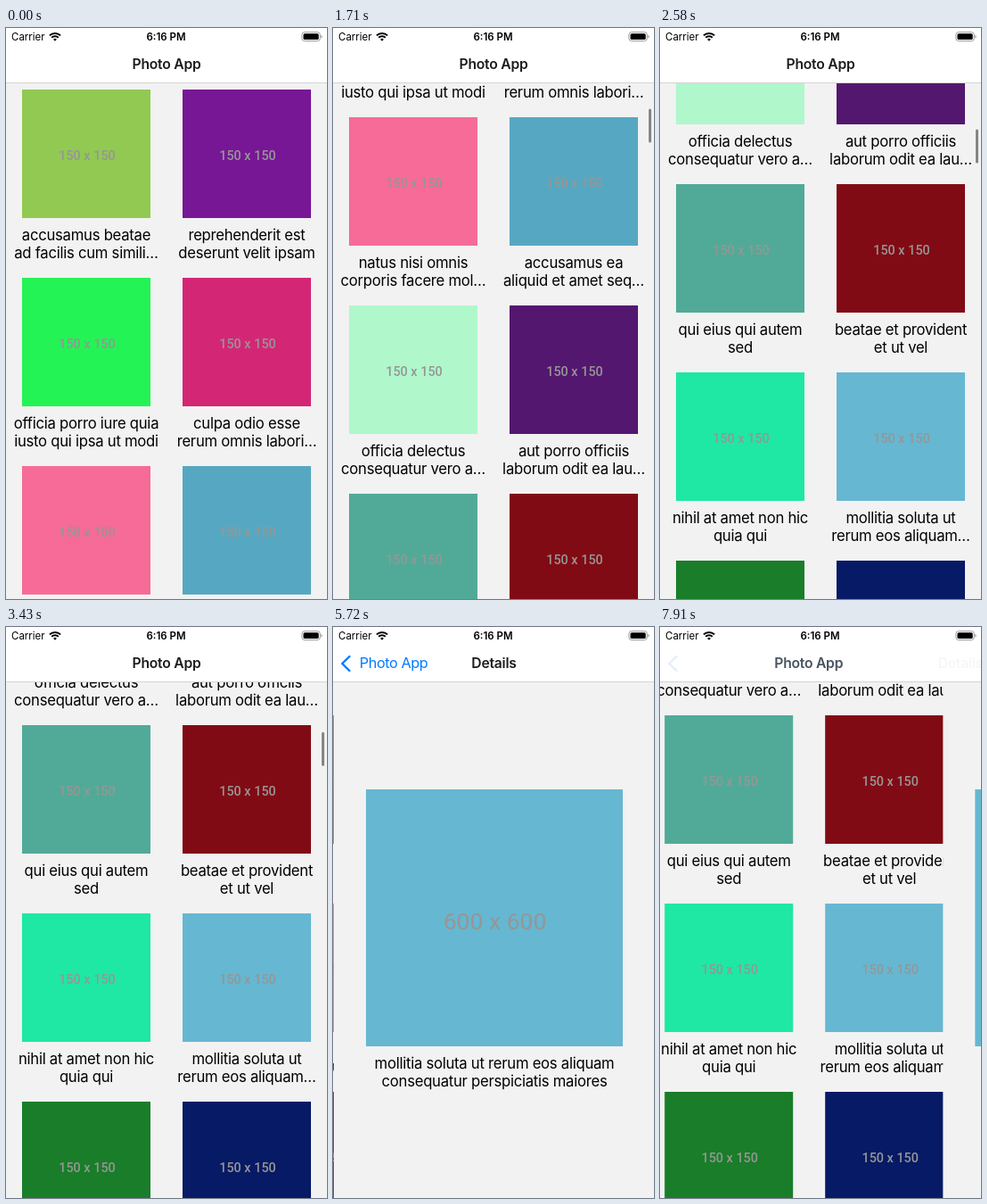
An HTML page that plays this animation: 360x640 px, repeating every 8 s.

```html
<!DOCTYPE html>
<html lang="en">
<head>
<meta charset="utf-8">
<title>Photo App</title>
<style>
  html, body { margin: 0; width: 100%; height: 100%; overflow: hidden; background: #fff; }
  svg { display: block; width: 360px; height: 640px; font-family: Inter, "Open Sans", sans-serif; }
  .label { font-size: 16.7px; letter-spacing: -.27px; text-anchor: middle; }
  .size { font-family: Roboto, Arial, sans-serif; font-size: 14.4px; font-weight: 500; fill: #969696; text-anchor: middle; }
  .big { font-size: 26.5px; font-weight: 400; }
  .title { font-size: 15.7px; font-weight: 600; letter-spacing: -.25px; fill: #1c1c1e; text-anchor: middle; }
  .back { font-size: 16.2px; letter-spacing: -.38px; fill: #007aff; }
  .status { font-size: 11.5px; }
</style>
</head>
<body>
<svg viewBox="0 0 360 640">
  <rect width="360" height="640" fill="#f2f2f2"/>
  <g id="home">
    <g id="list"></g>
    <rect id="bar" x="354" width="3" height="38" rx="1.5" fill="#858585"/>
  </g>
  <g id="detail">
    <rect width="360" height="640" fill="#f2f2f2"/>
    <rect x="36" y="182" width="288" height="288" fill="#66b7d2"/>
    <text class="size big" x="180.5" y="338.5">600 x 600</text>
    <text class="label" x="180" y="494.5">mollitia soluta ut rerum eos aliquam</text>
    <text class="label" x="180" y="515.2">consequatur perspiciatis maiores</text>
  </g>
  <rect width="360" height="61.5" fill="#fff"/>
  <rect y="61" width="360" height="1" fill="#d4d4d4"/>
  <text id="homeTitle" class="title" y="46">Photo App</text>
  <text id="detailTitle" class="title" y="46">Details</text>
  <g id="back">
    <path d="M18.5 33 L10.3 41 L18.5 49" fill="none" stroke="#007aff" stroke-width="2.4" stroke-linecap="round" stroke-linejoin="round"/>
    <text id="backLabel" class="back" y="46">Photo App</text>
  </g>
  <g class="status">
    <text x="6" y="14">Carrier</text>
    <text x="179.5" y="14" font-weight="600" text-anchor="middle">6:16 PM</text>
    <path d="M48.9 8.4a8.7 8.7 0 0 1 12.2 0M51.2 10.7a5.4 5.4 0 0 1 7.6 0" fill="none" stroke="#000" stroke-width="2"/>
    <path d="M53.1 12.7a2.7 2.7 0 0 1 3.8 0L55 14.8z"/>
    <rect x="331.9" y="4.7" width="20.4" height="9.8" rx="2.8" fill="none" stroke="#999" stroke-width="1"/>
    <rect x="333.5" y="6.2" width="17.2" height="6.8" rx="1.6"/>
    <path d="M353.4 8v3.4q1.3-.4 1.3-1.7t-1.3-1.7z" fill="#999"/>
  </g>
</svg>
<script>
const LOOP = 8000, ROW = 211, REST = 815, OMEGA = 0.015;
const PUSH = 5180, POP = 7665;

const photos = [
  ['#92c952', 'accusamus beatae', 'ad facilis cum simili…'],
  ['#771796', 'reprehenderit est', 'deserunt velit ipsam'],
  ['#24f355', 'officia porro iure quia', 'iusto qui ipsa ut modi'],
  ['#d32776', 'culpa odio esse', 'rerum omnis labori…'],
  ['#f66b97', 'natus nisi omnis', 'corporis facere mol…'],
  ['#56a8c2', 'accusamus ea', 'aliquid et amet seq…'],
  ['#b0f7cc', 'officia delectus', 'consequatur vero a…'],
  ['#54176f', 'aut porro officiis', 'laborum odit ea lau…'],
  ['#51aa97', 'qui eius qui autem', 'sed'],
  ['#810b14', 'beatae et provident', 'et ut vel'],
  ['#1ee8a4', 'nihil at amet non hic', 'quia qui'],
  ['#66b7d2', 'mollitia soluta ut', 'rerum eos aliquam…'],
  ['#197d29', '', ''],
  ['#061a65', '', '']
];

// The screen refreshes in coarse steps: [first, last, count]
const runs = [[1370, 2140, 8], [2250, 2980, 8], [3080, 3850, 8], [3960, 3960, 1],
              [4100, 4100, 1], [5190, 5720, 6], [7600, 7910, 4]];
// Distance left to scroll while the flick decays
const decay = [[1370, 790], [1700, 424], [2562.86, 77], [3410, 12], [4100, 1]];

const $ = id => document.getElementById(id);
const shift = (id, x, y = 0) => $(id).setAttribute('transform', `translate(${x} ${y})`);
const fade = (id, v) => $(id).setAttribute('opacity', v);

$('list').innerHTML = photos.map(([color, a, b], i) => {
  const x = i % 2 * 180, y = 69 + Math.floor(i / 2) * ROW;
  return `<g transform="translate(${x} ${y})">
    <rect x="18" width="144" height="144" fill="${color}"/>
    <text class="size" x="91" y="79">150 x 150</text>
    <text class="label" x="90" y="168.5">${a}</text>
    <text class="label" x="90" y="189.2">${b}</text></g>`;
}).join('');

function snap(t) {
  let at = 0;
  for (const [first, last, count] of runs) {
    if (t < first) break;
    const step = count > 1 ? (last - first) / (count - 1) : 1;
    at = first + step * Math.min(count - 1, Math.floor((t - first) / step + 1e-6));
  }
  return at;
}

function scrollAt(t) {
  if (t < decay[0][0]) return 0;
  for (let i = 1; i < decay.length; i++) {
    const [t0, a] = decay[i - 1], [t1, b] = decay[i];
    if (t <= t1) return Math.round(REST - a * Math.pow(b / a, (t - t0) / (t1 - t0)));
  }
  return REST - 1;
}

// Critically damped spring: share of the way left
function spring(ms) {
  const x = Math.max(0, ms) * OMEGA;
  return (1 + x) * Math.exp(-x);
}

function render(time) {
  const t = snap(time);
  const scroll = scrollAt(t);
  const p = t < POP ? 1 - spring(t - PUSH) : spring(t - POP);

  shift('list', 0, -scroll);
  shift('home', -108 * p);
  shift('detail', 360 * (1 - p));
  $('bar').setAttribute('y', 64.5 + scroll * 0.0664);
  fade('bar', t >= 1370 && t < 5190 ? 1 : 0);

  shift('homeTitle', 180 - 112 * p);
  fade('homeTitle', Math.max(0, 1 - 2 * p));
  shift('detailTitle', 180 + 178 * (1 - p));
  fade('detailTitle', p < 0.4 ? p / 4 : 0.1 + (p - 0.4) * 1.5);
  shift('backLabel', 29.5 + 112 * (1 - p));
  fade('back', t >= 7600 ? Math.min(0.4, p) : p);
}

function tick() {
  render(performance.now() % LOOP);
  requestAnimationFrame(tick);
}
tick();
</script>
</body>
</html>
```
